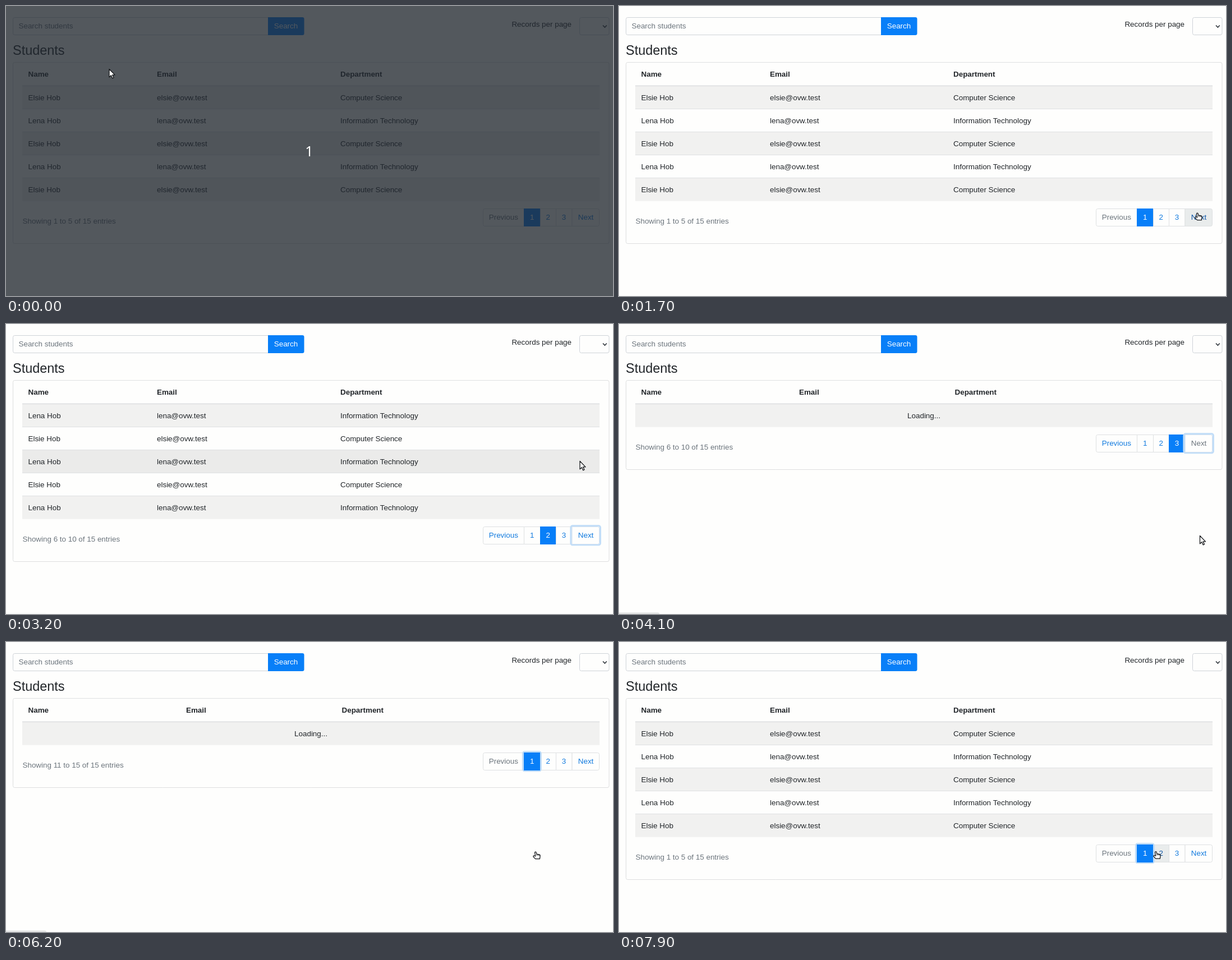
These frames come from a looping animation (1082 by 517 pixels, 8 s). An HTML page with a canvas:

```html
<!DOCTYPE html>
<html lang="en">
<head>
<meta charset="utf-8">
<title>Students table</title>
<style>
  html, body { margin: 0; width: 100%; height: 100%; overflow: hidden; background: #fefefd; }
  canvas { display: block; width: 1082px; height: 517px; }
</style>
</head>
<body>
<canvas id="stage" width="1082" height="517"></canvas>
<script>
const ctx = document.getElementById('stage').getContext('2d');
const W = 1082, H = 517, LOOP = 8000, STEP = 100;
const SANS = '"Liberation Sans", Arial, sans-serif';
const BODY = `13.42px ${SANS}`, BOLD = `bold 13.42px ${SANS}`;
const PAGE = '#fefefd', INK = '#212529', MUTED = '#6c757d', LINE = '#dee0e2',
      BLUE = '#087ff8', LINK = '#127bdf', LINK_DARK = '#0f57a8',
      STRIPE = '#f1f1f0', HOVER = '#ebebea', LINK_HOVER = '#e9ecec';

const people = [
  ['Elsie Hob', 'elsie@ovw.test', 'Computer Science'],
  ['Lena Hob', 'lena@ovw.test', 'Information Technology']
];

// Table states: start time, requested page, loaded page
const phases = [
  [0, 1, 1], [2000, 2, 1], [3000, 2, 2], [4000, 3, 2],
  [5200, 3, 3], [6200, 1, 3], [6900, 1, 1]
];

// Pointer moves: first step, last step, destination
const moves = [
  [700, 800, 150, 216], [1000, 1100, 57, 325], [1300, 1700, 1031, 369],
  [3000, 3200, 1023, 244.5], [3400, 3800, 1035.5, 377.5], [4800, 5000, 1021, 268],
  [5200, 6000, 944, 374], [6900, 7300, 958, 243], [7500, 7900, 957, 373.5]
];

// Status bubble: shown, starts fading
const bubbles = [[2000, 3000], [4000, 5200], [6000, 6900]];

const links = [
  ['Previous', 850, 923], ['1', 923, 952], ['2', 952, 980],
  ['3', 980, 1008.5], ['Next', 1008.5, 1058]
];

const rowTop = i => 142 + 41 * i;

function pointerAt(t) {
  let x = 184, y = 112.5;
  for (const [from, to, nx, ny] of moves) {
    if (t < from) break;
    const p = Math.min(1, (t - from + STEP) / (to - from + STEP));
    x += (nx - x) * p;
    y += (ny - y) * p;
  }
  return { x, y };
}

function text(s, x, y, color = INK, font = BODY, align = 'left') {
  ctx.font = font;
  ctx.fillStyle = color;
  ctx.textAlign = align;
  ctx.fillText(s, x, y);
}

function rect(x, y, w, h, color) {
  ctx.fillStyle = color;
  ctx.fillRect(x, y, w, h);
}

function box(x, y, w, h, radii, fill, stroke, width = 1) {
  ctx.beginPath();
  ctx.roundRect(x, y, w, h, radii);
  if (fill) { ctx.fillStyle = fill; ctx.fill(); }
  if (stroke) { ctx.strokeStyle = stroke; ctx.lineWidth = width; ctx.stroke(); }
}

function drawToolbar() {
  box(12.5, 20.5, 455, 31, [3, 0, 0, 3], PAGE, '#ced3d8');
  text('Search students', 22.5, 40, MUTED);
  box(467, 20, 64.5, 32, [0, 3.3, 3.3, 0], BLUE);
  text('Search', 499, 40, '#fff', BODY, 'center');
  text('Records per page', 1008, 37, INK, BODY, 'right');
  box(1022.5, 20.5, 52.5, 31, 3, PAGE, '#ced3d8');
  ctx.beginPath();
  ctx.moveTo(1064, 34.5);
  ctx.lineTo(1067.4, 38);
  ctx.lineTo(1070.8, 34.5);
  ctx.strokeStyle = '#343a40';
  ctx.lineWidth = 1.7;
  ctx.stroke();
  text('Students', 12, 87, INK, `23.45px ${SANS}`);
}

function drawTable(page, loading, pointer) {
  const cols = loading ? [39.5, 321, 598.5] : [39.5, 269, 596];
  ['Name', 'Email', 'Department'].forEach((s, i) => text(s, cols[i], 126, INK, BOLD));
  const count = loading ? 1 : 5;
  for (let i = 0; i < count; i++) {
    const y = rowTop(i);
    const hovered = !loading && pointer.y >= y && pointer.y < y + 41;
    const fill = hovered ? HOVER : i % 2 ? PAGE : STRIPE;
    rect(29, y, 1029, i === count - 1 ? 41.7 : 41, fill);
    if (i) rect(29, y, 1029, 1, LINE);
    if (loading) {
      text('Loading...', 543.5, 168, INK, BODY, 'center');
    } else {
      people[(i + page - 1) % 2].forEach((s, c) => text(s, cols[c], y + 26, INK));
    }
  }
  rect(29, 100, 1029, 1, LINE);
  rect(29, 141.5, 1029, 1.7, LINE);
}

function drawLink(i, dy, active, hovered, focused) {
  const [label, x, end] = links[i];
  const w = end - x, y = 361 + dy;
  const current = label === String(active);
  const disabled = i === 0 ? active === 1 : i === 4 && active === 3;
  const radii = i === 0 ? [3, 0, 0, 3] : i === 4 ? [0, 3, 3, 0] : 0;
  if (focused) box(x - 1.6, y - 1.2, w + 3, 34, 3, null, '#c1ddf8', 3);
  const fill = current ? BLUE : hovered ? LINK_HOVER : PAGE;
  if (current) box(x, y, w, 32, radii, fill);
  else box(x + .5, y + .5, w - (i === 4 ? 1 : 0), 31, radii, fill, focused ? '#d2e1ef' : LINE);
  const color = current ? '#fff' : disabled ? MUTED : hovered ? LINK_DARK : LINK;
  text(label, x + w / 2 + .3, 381 + dy, color, BODY, 'center');
}

function linkUnder({ x, y }, active) {
  if (y < 361 || y > 393) return -1;
  const i = links.findIndex(l => x >= l[1] && x < l[2]);
  return (i === 0 && active === 1) || (i === 4 && active === 3) ? -1 : i;
}

function drawFooter(t, dy, active, page, hovered) {
  const last = page * 5;
  text(`Showing ${last - 4} to ${last} of 15 entries`, 29.5, 388 + dy, MUTED);
  const focused = t < 1900 ? -1 : t < 6200 ? 4 : 1;
  const order = [0, 1, 2, 3, 4].filter(i => i !== active && i !== focused);
  if (active !== focused) order.push(active);
  if (focused >= 0) order.push(focused);
  order.forEach(i => drawLink(i, dy, active, i === hovered, i === focused));
}

function drawBubble(t) {
  for (const [on, off] of bubbles) {
    if (t < on) continue;
    const alpha = t < off ? 1 : 1 - (t - off + STEP) / 350;
    if (alpha <= 0) continue;
    ctx.globalAlpha = alpha;
    box(-4, 514.3, 76, 8, 3, '#e4e5e5');
    ctx.globalAlpha = 1;
  }
}

function drawPointer({ x, y }, hand) {
  const arrowShape = 'M0 0V14.3L3.3 11.3L5.7 16.3L8 15.2L5.6 10.4H10Z';
  const handShape = 'M-1.5 1.2Q-.6 -.6 .9 .6L2 4.2L6.4 5Q8.3 5.4 8.1 7.4L7.4 12.6H-.3L-3.9 9Q-4.6 6.8 -2.4 7L-.3 8Z';
  const shape = new Path2D(hand ? handShape : arrowShape);
  ctx.save();
  ctx.translate(x, y);
  ctx.lineJoin = 'round';
  ctx.fillStyle = '#fff';
  ctx.strokeStyle = '#15171a';
  ctx.lineWidth = 1.3;
  ctx.fill(shape);
  ctx.stroke(shape);
  if (hand) {
    ctx.lineWidth = .8;
    ctx.stroke(new Path2D('M2 4.2V7M4.2 4.6V7M6.2 5V7.2'));
  }
  ctx.restore();
}

function draw(time) {
  const t = Math.floor(time / STEP) * STEP;
  const [, active, page] = phases.filter(p => p[0] <= t).pop();
  const loading = active !== page;
  const dy = loading ? -164 : 0;
  const pointer = pointerAt(t);
  const under = loading ? -1 : linkUnder(pointer, active);
  const staleHover = loading && t < 2800 ? 4 : -1;
  const hand = under >= 0 || (t >= 6200 && t < 6500);

  rect(0, 0, W, H, PAGE);
  drawToolbar();
  box(12.5, 100.5, 1062.5, 323 + dy, 3, PAGE, '#dddedf');
  drawTable(page, loading, pointer);
  drawFooter(t, dy, active, page, loading ? staleHover : under);
  drawBubble(t);
  if (t < 500) {
    rect(0, 0, W, H, 'rgba(32, 38, 46, .77)');
    text('1', 540.5, 268, '#fff', '25px "Noto Sans", "Open Sans", sans-serif', 'center');
  }
  drawPointer(pointer, hand);
}

const start = performance.now();
function tick() {
  draw((performance.now() - start) % LOOP);
  requestAnimationFrame(tick);
}
tick();
</script>
</body>
</html>
```
